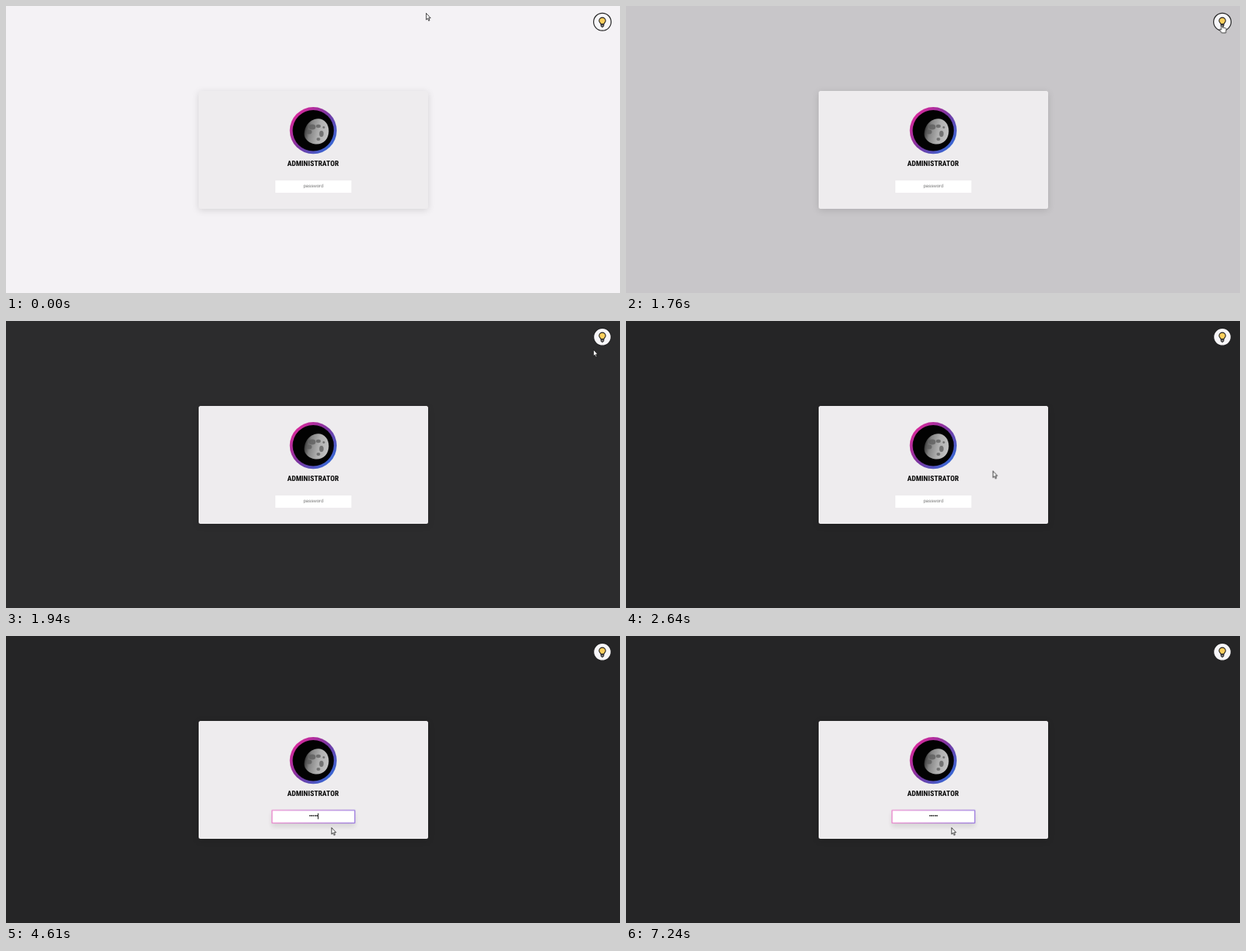
Recreate the animation shown at these times as an HTML page. Size 800 px wide and 375 px high, loop 7300 ms.

```html
<!DOCTYPE html>
<html lang="en">
<head>
<meta charset="utf-8">
<title>Login</title>
<style>
  :root { --loop: 7.3s infinite; }
  html, body { margin: 0; width: 100%; height: 100%; overflow: hidden; }
  body { background: #f4f2f5; }

  .stage {
    position: relative; width: 800px; height: 375px; overflow: hidden;
    text-rendering: geometricPrecision;
    animation: dim var(--loop);
  }
  .stage > * { position: absolute; }

  .card {
    left: 250.5px; top: 111px; width: 299px; height: 154px;
    border-radius: 2.5px; background: #eeecee;
    box-shadow: 0 2px 10px rgba(0, 0, 0, .13);
  }
  .art { left: 0; top: 0; width: 800px; height: 375px; }

  .name {
    left: 250px; top: 200px; width: 300px; line-height: 13px;
    text-align: center; color: #060606;
    font: 700 9.7px/13px "Roboto Condensed", Roboto, sans-serif;
    font-stretch: 75%;
  }

  .field {
    left: 350.5px; top: 228px; width: 99px; height: 15.5px;
    background: #fff; color: #111;
    font: 6.1px/15.5px "Liberation Sans", Arial, sans-serif;
    animation: grow var(--loop), shake var(--loop);
  }
  .field > * { position: absolute; }
  .edge, .fill { inset: 0; }
  .edge {
    background: linear-gradient(90deg, #e779c6, #8a63d8);
    box-shadow: 0 4px 6px rgba(0, 0, 0, .1);
    animation: reveal var(--loop);
  }
  .fill { inset: .9px; background: #fff; }
  .hint {
    inset: 0; text-align: center; color: #757575;
    animation: hint var(--loop) step-end;
  }
  .typed {
    left: 50%; top: 0; height: 100%; transform: translateX(-50%);
    animation: type var(--loop) step-end;
  }
  .dots { overflow: hidden; white-space: nowrap; height: 100%; }
  .caret {
    position: absolute; left: 100%; top: 4px; width: .9px; height: 7.2px;
    background: #222; animation: blink var(--loop) step-end;
  }

  .cursor { animation: travel var(--loop); fill: #fff; stroke: #111; stroke-width: .8; stroke-linejoin: round; }
  .arrow { animation: arrow var(--loop) step-end; }
  .hand { animation: hand var(--loop) step-end; }
  .beam { fill: none; animation: beam var(--loop) step-end; }

  @keyframes dim {
    0% { background: #f4f2f5; }
    23.45% { background: #f4f2f5; animation-timing-function: ease; }
    27.56%, 100% { background: #252526; }
  }
  @keyframes grow {
    0%, 42.33% { scale: 1; }
    45.07%, 100% { scale: 1.1; }
  }
  @keyframes reveal {
    0%, 42.33% { opacity: 0; }
    45.07%, 100% { opacity: 1; }
  }
  @keyframes shake {
    0%, 74.66%, 81.5%, 100% { translate: 0; }
    76.03%, 78.77% { translate: -15px; }
    77.4%, 80.14% { translate: 15px; }
  }
  @keyframes hint {
    0% { visibility: visible; }
    53.42%, 100% { visibility: hidden; }
  }
  @keyframes type {
    0% { width: 0; }
    53.42% { width: .35em; }
    55.62% { width: .7em; }
    57.81% { width: 1.05em; }
    60% { width: 1.4em; }
    62.33%, 100% { width: 1.75em; }
  }
  @keyframes blink {
    0%, 49.59%, 69.59%, 84.11%, 98.63%, 100% { visibility: hidden; }
    42.33%, 53.42%, 76.85%, 91.37% { visibility: visible; }
  }
  @keyframes travel {
    0% { transform: translate(547px, 9px); animation-timing-function: ease-in-out; }
    13.7%, 23.29% { transform: translate(776.5px, 23px); animation-timing-function: linear; }
    24.11% { transform: translate(776.5px, 24px); animation-timing-function: linear; }
    25.34% { transform: translate(773px, 30px); animation-timing-function: linear; }
    26.58% { transform: translate(765px, 37px); animation-timing-function: ease-in-out; }
    40.41%, 42.47% { transform: translate(408px, 234px); animation-timing-function: ease-in-out; }
    45.62%, 46.5% { transform: translate(424.5px, 249px); }
    47.95%, 100% { transform: translate(423.7px, 250px); }
  }
  @keyframes arrow {
    0%, 25.96%, 43.56%, 100% { visibility: visible; }
    12.33%, 39.45% { visibility: hidden; }
  }
  @keyframes hand {
    0%, 25.96%, 100% { visibility: hidden; }
    12.33% { visibility: visible; }
  }
  @keyframes beam {
    0%, 43.56%, 100% { visibility: hidden; }
    39.45% { visibility: visible; }
  }
</style>
</head>
<body>
<div class="stage">
  <div class="card"></div>

  <svg class="art" viewBox="0 0 800 375">
    <defs>
      <linearGradient id="ring" x1=".1" y1=".2" x2=".85" y2=".85">
        <stop offset="0" stop-color="#d42a9c"/>
        <stop offset=".5" stop-color="#7a35a0"/>
        <stop offset="1" stop-color="#3a66d2"/>
      </linearGradient>
      <linearGradient id="lit" x1="0" y1=".35" x2="1" y2=".55">
        <stop offset="0" stop-color="#2a2a2a"/>
        <stop offset=".25" stop-color="#858585"/>
        <stop offset=".6" stop-color="#b0b0b0"/>
        <stop offset="1" stop-color="#c2c2c2"/>
      </linearGradient>
    </defs>

    <circle cx="400.3" cy="162.7" r="30.6" fill="url(#ring)"/>
    <circle cx="400.3" cy="162.7" r="26.8" fill="#020202"/>
    <path d="M402 148C413 145 420.500 153 420.500 163.500C420.500 174 413 181.500 403 180.500C395 179.500 388.500 174 388.500 167C389 158 394 150.500 402 148Z" fill="url(#lit)"/>
    <g fill="#5c5c5c" opacity=".75">
      <ellipse cx="399" cy="158" rx="4.500" ry="3.500"/>
      <ellipse cx="395" cy="164.500" rx="3.500" ry="3"/>
      <ellipse cx="407" cy="157" rx="3" ry="2.200"/>
      <ellipse cx="411" cy="167" rx="2.800" ry="4"/>
      <ellipse cx="407" cy="174" rx="2.500" ry="2"/>
      <circle cx="414" cy="158.500" r="1.500"/>
    </g>

    <circle cx="777" cy="20.8" r="11.4" fill="#f8f7f9" stroke="#222223" stroke-width="1.2"/>
    <path d="M775.100 23.600C774.800 22.300 772.800 21.500 772.800 19.300A4.200 4.200 0 0 1 781.200 19.300C781.200 21.500 779.200 22.300 778.900 23.600Z" fill="#fbce5c" stroke="#1b1b1b" stroke-width="1.100"/>
    <path d="M775.200 23.800H778.800V26.200L777.900 27.400H776.100L775.200 26.200Z" fill="#77777a" stroke="#1b1b1b" stroke-width=".9"/>
  </svg>

  <div class="name">ADMINISTRATOR</div>

  <div class="field">
    <div class="edge"></div>
    <div class="fill"></div>
    <div class="hint">password</div>
    <div class="typed">
      <div class="dots">•••••</div>
      <div class="caret"></div>
    </div>
  </div>

  <svg class="art" viewBox="0 0 800 375">
    <g class="cursor">
      <path class="arrow" d="M.4.400V9L2.300 7.200L3.700 10.300L5 9.700L3.700 6.700H6.200Z"/>
      <path class="hand" d="M-.9.900Q0-.4.900.900V4L4.800 4.900Q5.900 5.200 5.700 6.500L5 9.500V11H-.4L-3 7.200Q-3.200 5.900-1.900 6.200L-.9 7Z"/>
      <path class="beam" d="M-1.500-4.500H1.500M0-4.500V4.500M-1.500 4.500H1.500"/>
    </g>
  </svg>
</div>
</body>
</html>
```
